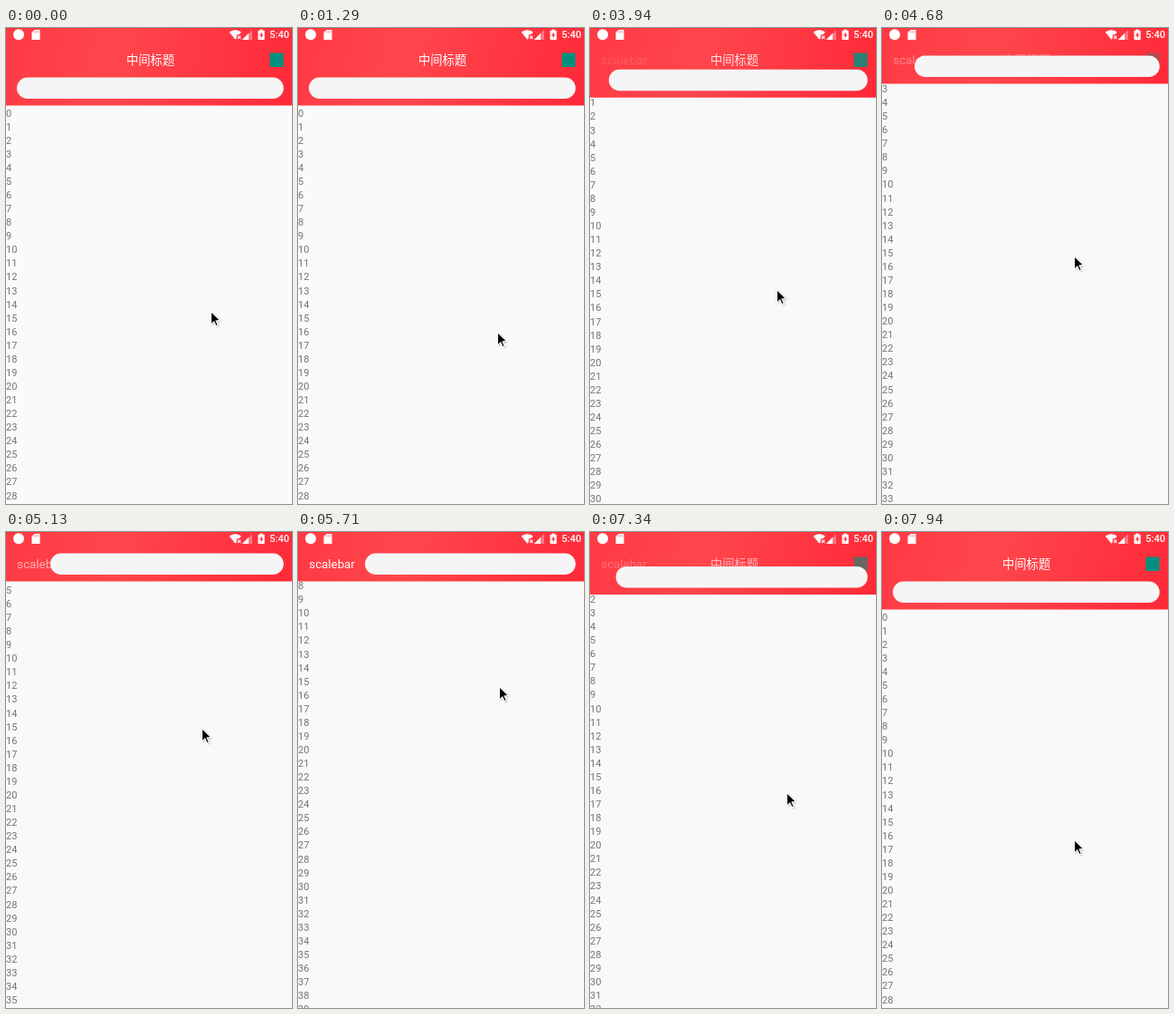
Write an HTML page with a canvas that moves like this. It is 316x525 px and loops after 8 s.

```html
<!DOCTYPE html>
<html lang="zh">
<head>
<meta charset="utf-8">
<title>Collapsing header</title>
<style>
  html, body { margin: 0; width: 100%; height: 100%; overflow: hidden; background: #fafafa; }
  canvas { display: block; width: 316px; height: 525px; }
</style>
</head>
<body>
<canvas id="stage"></canvas>
<script>
const W = 316, H = 525, LOOP = 8000, STEP = 147;
const canvas = document.getElementById('stage');
const dpr = window.devicePixelRatio || 1;
canvas.width = W * dpr;
canvas.height = H * dpr;
const ctx = canvas.getContext('2d');
const CJK = '"Noto Sans CJK SC", "Noto Sans CJK", sans-serif';
const LATIN = 'Roboto, sans-serif';

// The drag, in steps: press, turning point, list back at the top.
const PRESS = 22, TURN = 39, REST = 53.1, REACH = 155;

// Turning points of the pointer: [step, x, y]
const POINTER = [
  [0, 226, 313], [3, 222, 331], [6, 220, 338], [9, 220, 336], [12, 220, 308],
  [16, 220, 335], [18, 214, 302], [20, 199, 326], [PRESS, 199, 326],
  [32, 212, 252], [TURN, 222, 171], [50, 217, 288], [54, 212, 340]
];

const clamp = v => Math.max(0, Math.min(1, v));

function pointerAt(n) {
  const i = Math.max(1, POINTER.findIndex(p => p[0] >= n));
  const a = POINTER[i - 1], b = POINTER[i];
  const k = (n - a[0]) / (b[0] - a[0]);
  return [1, 2].map(c => Math.round(a[c] + (b[c] - a[c]) * k));
}

// Slow start on the way up, quicker finish on the way down.
function offsetAt(n) {
  return n < TURN
    ? REACH * clamp((n - PRESS) / (TURN - PRESS)) ** 1.45
    : REACH * clamp((REST - n) / (REST - TURN)) ** 0.75;
}

function shape(points, fill) {
  ctx.beginPath();
  points.forEach(([x, y]) => ctx.lineTo(x, y));
  ctx.closePath();
  ctx.fillStyle = fill;
  ctx.fill();
}

function box(x, y, w, h, fill, r = 0) {
  ctx.beginPath();
  ctx.roundRect(x, y, w, h, r);
  ctx.fillStyle = fill;
  ctx.fill();
}

function label(text, x, y, font, fill) {
  ctx.font = font;
  ctx.fillStyle = fill;
  ctx.fillText(text, x, y);
}

function drawList(offset) {
  for (let i = 0; i < 45; i++) {
    label(String(i), 0, 97.6 + i * 15.07 - offset, '11px ' + LATIN, '#747474');
  }
}

function drawStatus() {
  // Notification dot and memory card
  box(8, 1.2, 12, 12, '#fff', 6);
  shape([[31.5, 2], [37.5, 2], [37.5, 13], [28.5, 13], [28.5, 5]], '#fff');
  for (const x of [31.3, 33.3, 35.3]) box(x, 3.3, 0.9, 2.2, '#ff7a7e');

  // Wi-Fi without a connection
  ctx.beginPath();
  ctx.moveTo(253.3, 12.8);
  ctx.lineTo(246.8, 4.6);
  ctx.quadraticCurveTo(253.3, -0.2, 259.8, 4.6);
  ctx.lineTo(257.5, 7.3);
  ctx.lineTo(254.8, 7.3);
  ctx.lineTo(254.8, 11);
  ctx.fillStyle = '#fff';
  ctx.fill();
  ctx.beginPath();
  ctx.moveTo(256, 8.6); ctx.lineTo(259.4, 12.2);
  ctx.moveTo(259.4, 8.6); ctx.lineTo(256, 12.2);
  ctx.strokeStyle = '#fff';
  ctx.lineWidth = 1.1;
  ctx.stroke();

  // Mobile signal
  shape([[272, 2], [272, 13], [261, 13]], 'rgba(255,255,255,.35)');
  shape([[268, 6], [268, 13], [261, 13]], '#fff');

  // Charging battery
  box(280.6, 1.6, 3, 2, '#fff');
  box(278.5, 2.7, 7.2, 10.4, '#fff', 0.8);
  shape([[282.8, 4.3], [280, 8.6], [281.7, 8.6], [281.7, 11.6], [284.3, 7.3], [282.8, 7.3]], '#ff333f');
  label('5:40', 291.3, 11.4, '500 11px ' + LATIN, '#fff');
}

function drawHeader(scroll) {
  const shift = Math.min(31, scroll / 2);
  const left = 12 + Math.min(62.5, scroll / 2);

  const g = ctx.createLinearGradient(0, 0, W, 85);
  g.addColorStop(0, '#ff3a45');
  g.addColorStop(0.38, '#ff464c');
  g.addColorStop(1, '#ff2938');
  box(0, 0, W, 85.5 - shift, g);
  drawStatus();

  ctx.globalAlpha = 1 - clamp(scroll / 62) ** 1.5;
  label('中间标题', 133, 40, '13.3px ' + CJK, '#fff');
  box(291.5, 27.5, 15, 15.5, '#03907f');
  ctx.globalAlpha = clamp(scroll / 125);
  label('scalebar', 12.3, 40.2, '13.3px ' + LATIN, '#fff');
  ctx.globalAlpha = 1;

  box(left, 54.5 - shift, 306.7 - left, 23.5, '#f5f5f5', 11.75);
}

function drawPointer([x, y]) {
  ctx.save();
  ctx.translate(x + 0.5, y - 0.5);
  ctx.shadowColor = 'rgba(0,0,0,.35)';
  ctx.shadowBlur = 2 * dpr;
  ctx.shadowOffsetX = ctx.shadowOffsetY = dpr;
  shape([[0, 0], [0, 14.6], [3.3, 11.5], [5.6, 16.6], [8, 15.6], [5.8, 10.6], [10.2, 10.3]], '#fff');
  ctx.shadowColor = 'transparent';
  ctx.lineJoin = 'round';
  ctx.lineWidth = 1;
  ctx.strokeStyle = '#fff';
  ctx.stroke();
  shape([[0.6, 1.4], [0.6, 13.2], [3.5, 10.4], [5.9, 15.6], [7.1, 15.1], [4.8, 9.9], [8.8, 9.6]], '#000');
  ctx.restore();
}

function draw(time) {
  // The picture refreshes about seven times a second.
  const n = Math.floor((time % LOOP + 34) / STEP);
  const offset = offsetAt(n);
  // The list scrolls twice as far as the header folds, until it is folded.
  const scroll = offset < 93 ? offset / 1.5 : offset - 31;

  ctx.setTransform(dpr, 0, 0, dpr, 0, 0);
  box(0, 0, W, H, n <= PRESS ? '#fafafa' : '#f9f9f9');
  drawList(offset);
  drawHeader(scroll);
  drawPointer(pointerAt(n));
}

const start = performance.now();
function tick() {
  draw(performance.now() - start);
  requestAnimationFrame(tick);
}
tick();
</script>
</body>
</html>
```
